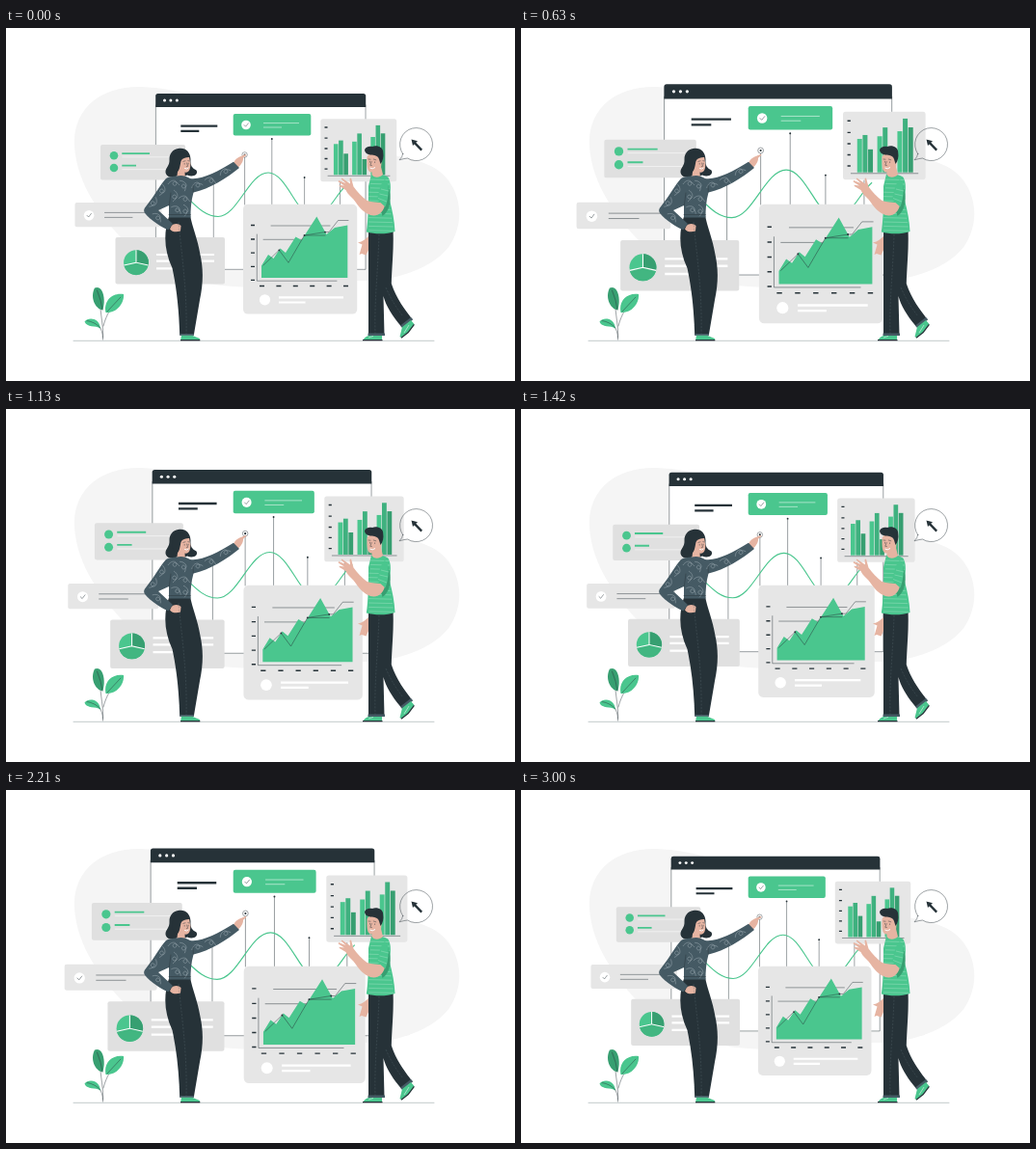
Recreate the animation shown at these times as an HTML page. Size 528x366 px, loop 3.04 s.

```html
<!DOCTYPE html>
<html lang="en">
<head>
<meta charset="utf-8">
<title>Data dashboard</title>
<style>
html, body { margin: 0; width: 100%; height: 100%; overflow: hidden; background: #fff }
svg { display: block; width: 528px; height: 366px }
.green { fill: #4ac68e }
.deep { fill: #379f71 }
.ink { fill: #263238 }
.white { fill: #fff }
.skin { fill: #e6b4a2 }
.wool { fill: #455a64 }
.panel { fill: #e6e6e6 }
.shade { fill: #e0e0e0 }
.line { fill: none; stroke: #263238; stroke-width: .45; stroke-linecap: round; stroke-linejoin: round }
.soft { stroke: #78868c }
.pale { fill: none; stroke: #fff; stroke-width: .5 }
.tick { stroke-width: 1.3; stroke-linecap: butt }
.bar { stroke-width: 2.2; stroke-linecap: butt }
.slice { stroke-width: 1 }
.seam { fill: none; stroke: #5b6b73; stroke-width: .35; stroke-dasharray: 2 1.5 }
</style>
</head>
<body>
<svg viewBox="0 0 528 366">
  <path fill="#f5f5f5" d="M71 118C71 82 100 60 140 61C205 63 260 98 320 115C360 128 405 129 436 141C470 154 480 196 460 226C443 249 405 262 370 262C310 262 285 271 235 268C185 265 138 242 110 207C88 180 71 150 71 118Z"/>
  <path class="line soft" d="M70 324.3H444"/>

  <g id="screen">
    <!-- browser window -->
    <rect class="white" x="155.4" y="70" width="217.6" height="180.3"/>
    <path class="line" d="M155.4 80V250.3H373V80"/>
    <path class="ink" d="M155.2 82V70.5Q155.2 68 157.7 68H370.7Q373.2 68 373.2 70.5V82Z"/>
    <g class="white"><circle cx="164.5" cy="75" r="1.5"/><circle cx="170.9" cy="75" r="1.5"/><circle cx="177.3" cy="75" r="1.5"/></g>
    <path class="line bar" d="M181.3 101.6H219.3M181.3 106.8H200.3"/>

    <!-- wave and markers -->
    <path class="line" d="M215.3 160V217M247.6 134V183M275.8 115V183M309.6 155V183M346.5 160V183"/>
    <path fill="none" stroke="#4ac68e" stroke-width="1.1" d="M186 174C197 184 206 195.5 220 195.5C240 195.5 252 150 272 150C291 150 302 195.5 319 195.5C334 195.5 342 172 354 162"/>
    <circle class="white" cx="247.6" cy="131.4" r="2.7" stroke="#263238" stroke-width=".4"/>
    <g class="ink"><circle cx="247.6" cy="131.4" r="1"/><circle cx="275.8" cy="115" r=".9"/><circle cx="309.6" cy="155" r=".9"/></g>

    <!-- green notice -->
    <rect class="green" x="235.7" y="89" width="80.6" height="22.5" rx="2"/>
    <circle class="white" cx="249" cy="100.5" r="4.8"/>
    <path class="line" d="M247 100.6L248.6 102.2L251.4 98.8"/>
    <path class="pale" d="M267 98.6H304M267 103H286"/>

    <!-- list card -->
    <rect class="shade" x="98" y="121" width="88" height="36.5" rx="2"/>
    <g class="green">
      <circle cx="112" cy="132.2" r="4.3"/><circle cx="112" cy="145" r="4.3"/>
      <path d="M120.3 129.2H149V131H120.3ZM120.3 141.7H135V143.5H120.3Z"/>
    </g>
    <path class="pale" d="M120.5 133.8H175M120.5 146.6H175"/>

    <!-- check card -->
    <rect class="panel" x="71.5" y="181" width="90" height="25.2" rx="2"/>
    <circle class="white" cx="86.1" cy="194.2" r="5.3"/>
    <path class="line" d="M84 194.3L85.7 196L88.4 192.4M102.5 191.4H152M102.5 196.4H131"/>

    <!-- pie card -->
    <rect class="shade" x="113.5" y="217" width="113.5" height="48.4" rx="2"/>
    <circle class="green" cx="135" cy="243.2" r="12.9"/>
    <path class="deep" d="M135 243.2V230.3A12.9 12.9 0 0 1 147.6 246Z"/>
    <path fill="#42b681" d="M135 243.2L147.6 246A12.9 12.9 0 0 1 122.4 246Z"/>
    <path class="pale slice" d="M135 230.3V243.2L147.6 246M135 243.2L122.4 246"/>
    <path class="pale bar" d="M156 235H216M156 241.7H216M156 249.3H201"/>

    <!-- area chart card -->
    <rect class="panel" x="246" y="182.8" width="118.2" height="113.8" rx="5"/>
    <path class="line" d="M260.3 214V262.2H343M275 205H336M267 219.3H309"/>
    <path class="green" d="M265 259V246.5L272 235L277.5 239L284.5 228.5L290 233L300.5 216.5L306.5 220L322.3 195.5L332.5 214L341 207L354.3 204.5V259Z"/>
    <path class="line" d="M267 246L283.3 230.3L293 243.3L309.5 215L331 211.6H335L344.5 199.5H355M309.5 215H331"/>
    <g class="ink"><circle cx="283.3" cy="230.3" r=".9"/><circle cx="309.5" cy="215" r=".9"/><circle cx="331" cy="211.6" r=".9"/></g>
    <path class="line tick" d="M254 204.5H258M254 219H258M254 233.2H258M254 247.3H258M254 261.3H258"/>
    <path class="line tick" stroke-dasharray="5 12.4" d="M263 267.5H356"/>
    <circle class="white" cx="268.5" cy="281.8" r="5.6"/>
    <path class="pale bar" d="M283 279.3H350M283 284.5H310.5"/>

    <!-- bar chart card -->
    <rect class="panel" x="326.3" y="94.3" width="78.9" height="65" rx="2.5"/>
    <path class="line tick" d="M330.5 103H333.5M330.5 114.2H333.5M330.5 125H333.5M330.5 135.5H333.5M330.5 146.2H333.5"/>
    <path class="line" d="M334 153.3H398"/>
    <g id="bars"></g>
  </g>

  <!-- plant -->
  <path class="line" d="M100.5 323C101.5 309 98 300 97 278M101 309C104 297 110 288 117 280M100.5 321C100 311 96 307 86 304"/>
  <path class="deep" d="M100.3 292.5C92 291 87 279 92 269.5C100 266 104 280 100.3 292.5Z"/>
  <path class="green" d="M103.5 295C101 283 110 274 122 276C123 285 115 296 103.5 295ZM98 311.5C93 308 84 311 81.5 304.5C85 299.5 97 300 98 311.5Z"/>
  <path class="line" d="M94.5 272Q99 283 100 292M119 279L105 294M84 303.5Q93 305 98 311"/>

  <!-- woman -->
  <g>
    <path class="ink" d="M178.5 125C186 123.5 191 128 191.5 136C191 143 193 145 197.5 147.5C200 152 194 155 188 152.5C184 155 181 153 178 153C172 156.5 165 154 165.5 148.5C166 144 170 143 169.5 136C169.5 130 173 126 178.5 125Z"/>
    <path class="skin" d="M179 134C181 130.5 187 130 190 133.5L191.3 140.5C191.5 147 189.5 150.5 185.5 149.5L186 157L177 157L178.5 145Z"/>
    <path class="ink" d="M173 136C175 127 186 125 191 134C186 134 183 135 181.5 138C180.5 143 180 148 177 150C173 147 171 141 173 136Z"/>
    <path class="line" d="M183.8 138.4L186 137.8M188.8 137.6L190.2 138M185.2 140.4V141.2M189.2 140.2V141M187.6 140L188.6 143.3L187.3 143.6"/>
    <path class="pale slice" d="M185.2 145.4Q187.5 147 189.5 144.8"/>
    <path class="skin" d="M236 140C238 135 242 133.5 249 130.8L249.3 132L246 134.8C246.3 138.5 243.5 142.5 240 145.5Z"/>
    <path class="ink" d="M169.5 194H191C193 206 199 219 201.5 235C204.5 249 205 263 201 282L194.8 318.5H180.2C179.5 292 177 270 172.5 249C164 230 163 213 169.5 194Z"/>
    <path class="wool" d="M177 153.5C181 152.5 186 152.5 191 156C204 157.5 219 149 236 138.8L242 145C230 155 211 167 194.5 170.5C192 179 191.5 188 191.5 196.5H169V184L158 189L173 203L168.5 209.3C160 206 150 199 144.5 192.5C142 189 143.5 187 145.5 184.5C154 174 159 164 166 156C169 154 173 154 177 153.5Z"/>
    <path class="skin" d="M171.5 205.5C174 202 179 202.5 181.5 205L181 210.5C177 212 172 211.5 170 208.5Z"/>
    <g id="knit" fill="none" stroke="#a3b1b8" stroke-width=".45"></g>
    <path class="line" d="M169.3 184L171 171M194.3 170L194 163M169 193.5H191.5"/>
    <path class="seam" d="M179 201C182 234 188 271 187 317"/>
    <path class="wool" d="M180.2 317H195.1L194.8 318.8H180.3Z"/>
    <path class="green" d="M182 318.8H193L201 322V324H181Z"/>
    <path class="line tick" d="M181 323.7H201.3"/>
  </g>

  <!-- man -->
  <g>
    <path class="skin" d="M377 215C373.5 218.5 370 221.5 365 222.5L369.5 224.5L366.5 235L369 234L373.5 235.5L378.5 225Z"/>
    <path class="ink" d="M376 209H401.5C402.5 230 400 250 399.8 265C405 281 414 292 421 301.5L410 309.5C401 299 394 288 391.5 278L392.5 318.5H376Z"/>
    <path class="seam" d="M387 214C386 250 382 282 383 317M394 269Q402 287 412 299"/>
    <path class="green" d="M379 151.5Q388 149.5 396.3 154.5C400 160 399 169 397.8 178C401 190 403 200 403.5 211C395 214 383 214 373.8 211.5C376 199 376 178 376 164Z"/>
    <g id="stripes" stroke="#a4e3c6" stroke-width=".45"></g>
    <path class="skin" d="M376 142L388.8 143L391 152C387 156 381 155 379.5 152V149.5C374 150 374.5 141 374.5 134C377 128 388 127 390 134L389 145Z"/>
    <path class="ink" d="M372 127C372.5 123 377 122.5 380 123C385 121 391.5 124 391.2 129C392 133 391 138 388.5 141L387 136C386 132 382 132 378 131.5C375 131 373 130 372 127Z"/>
    <path class="line" d="M376 136L378 136.2M381.3 136L383.8 136.8M377.5 138.3V139.2M382.6 138.8V139.6M379.2 138.5L377.8 142.3L379.4 142.5"/>
    <path class="pale slice" d="M377.5 145Q380 147 383 144.5"/>
    <path class="deep" d="M396 163C401 175 399 189 390.5 195L388 186Z"/>
    <path class="skin" d="M391.5 181C386 181 379 180.5 374.5 179C369 175 364.5 170 360.5 164.5L358 155.5L356.5 156L357 161.5L348.5 155.5L347.7 156.5L352.5 161L345 158L344.7 159.5L351 163.5L345.6 162.7L345.8 164L352.5 168C354.5 173 360 176 363 181C367 187 372 192 378 194C386 196 391 191 393 184Z"/>
    <path class="green" d="M385 178C387 168 389 160 393 157C398.5 161 397.5 174 393.5 185.5Z"/>
    <path stroke="#a4e3c6" stroke-width=".45" d="M389 167L397 169M387.5 172L396 174M386 176.5L395 180"/>
    <path class="wool" d="M375.5 316.5H393V319H375.5ZM420 300L422.3 302.2L411 311L409 308.5Z"/>
    <path class="green" d="M376 319H390V324H370.5Q371 321 376 319ZM411 310L420 303L423.5 307L417 315.5L410 321L408.5 320Z"/>
    <path class="pale" d="M376 321L381 319.5M413 316L418 308"/>
    <path class="line tick" d="M370 323.7H390.5M410 321.2L417 315.8L423.4 307.3"/>
  </g>

  <!-- pointer bubble -->
  <path class="line" d="M411.7 130.5A17 17 0 1 1 416.5 135Q413.5 135.2 408 136.8Q411.3 134 411.7 130.5Z"/>
  <path class="ink" d="M420.5 115.5L427 117.2L425.3 118.8L432 125.8L430.4 127.4L423.6 120.4L422 122Z"/>
</svg>
<script>
const byId = id => document.getElementById(id);

// three groups of three bars: tops, standing on one base line
const tops = [[120.3, 116.6, 130.3], [117.8, 109.4, 136], [113, 100.9, 109.3]];
const base = 152.3, fills = ['#4ac68e', '#3fb17f', '#379f71'];
byId('bars').innerHTML = tops.flatMap((group, g) => group.map((y, i) =>
  `<rect x="${339.9 + g * 19.2 + i * 5.2}" y="${y}" width="4.6" height="${base - y}" fill="${fills[i]}"/>`)).join('');

// curls on the sweater: start point and turn of each
const curls = [[174, 161, 0], [184, 163, 60], [175, 174, 90], [185, 177, 10], [177, 188, 30], [186, 189, 80],
  [198, 163, -20], [212, 158, 10], [227, 149, -30], [162, 168, 100], [153, 181, 120], [157, 196, 40]];
byId('knit').innerHTML = curls.map(([x, y, turn]) =>
  `<path transform="translate(${x} ${y}) rotate(${turn})" d="M-6 1C-3-4 3-4 3 0C3 3-1 3-1 0C0-3 4-1 6 2"/>`).join('');

let stripes = '';
for (let y = 157; y < 212; y += 4.4) {
  const left = y < 166 ? 378 : 376.2, right = y < 180 ? 398 : 397 + (y - 176) * .16;
  stripes += `<path d="M${left} ${y}L${right} ${y + .6}"/>`;
}
byId('stripes').innerHTML = stripes;

// the screen swells and shrinks around one point: time in ms, scale
const loop = 3040;
const keys = [[0, 1], [570, 1.09], [1740, .994], [2375, 1.091], [2580, 1.054], [3010, .993], [loop, 1]];

function scaleAt(t) {
  const i = keys.findIndex(k => k[0] > t);
  const [t0, s0] = keys[i - 1], [t1, s1] = keys[i];
  return s0 + (s1 - s0) * (t - t0) / (t1 - t0);
}

const screen = byId('screen');
function draw() {
  const s = scaleAt(performance.now() % loop);
  screen.setAttribute('transform', `translate(235.5 183) scale(${s}) translate(-235.5 -183)`);
  requestAnimationFrame(draw);
}
draw();
</script>
</body>
</html>
```
